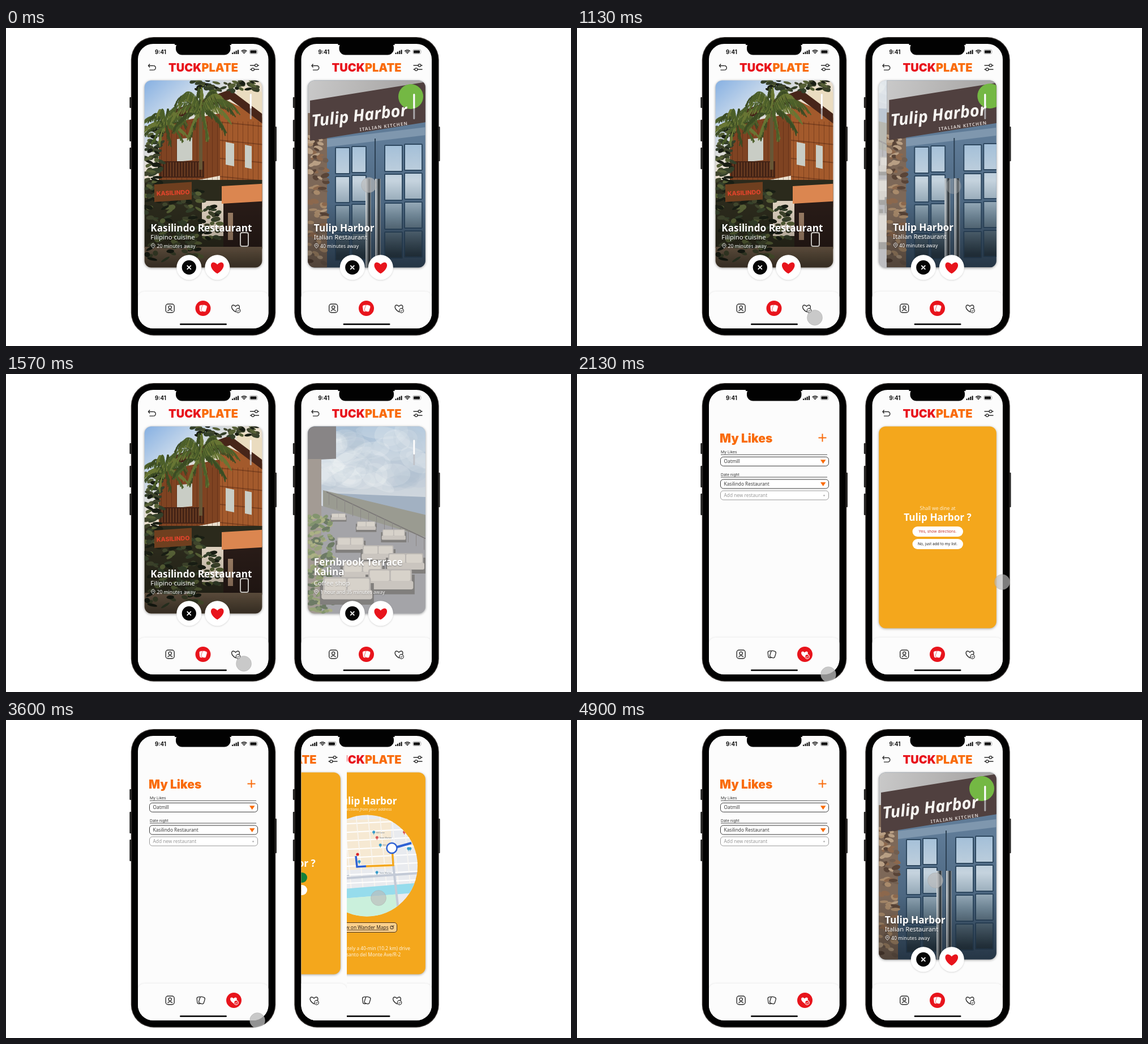
Animation of 998x561 px, one loop 4930 ms. Source, as an HTML page with a canvas:

```html
<!DOCTYPE html>
<html lang="en">
<head>
<meta charset="utf-8">
<title>Restaurant picker</title>
<style>
html, body { margin: 0; width: 100%; height: 100%; overflow: hidden; background: #fff }
canvas { display: block; width: 998px; height: 561px }
</style>
</head>
<body>
<canvas id="stage" width="998" height="561"></canvas>
<script>
const g = document.getElementById('stage').getContext('2d');
const LOOP = 4930, GAP = 288.5;
const RED = '#e8141c', ORANGE = '#f96c0c', AMBER = '#f4a71c', INK = '#2b2b2b', PAPER = '#fcfcfc';
const NOTO = '"Noto Sans", "Open Sans", sans-serif', INTER = 'Inter, sans-serif';
const CARD = { x: 244.7, y: 92.5, w: 207.6, h: 330, mid: 348.5 };

// ---------- helpers ----------
const smooth = (t, from, to) => {
  const p = Math.min(1, Math.max(0, (t - from) / (to - from)));
  return p * p * (3 - 2 * p);
};
const repeat = (n, draw) => { for (let i = 0; i < n; i++) draw(i); };
let seed = 1;
const rnd = (a = 0, b = 1) => a + (b - a) * ((seed = seed * 16807 % 2147483647) / 2147483647);

function group(draw) { g.save(); draw(); g.restore(); }
function paint(fill, stroke, width = 1) {
  if (fill) { g.fillStyle = fill; g.fill(); }
  if (stroke) { g.strokeStyle = stroke; g.lineWidth = width; g.stroke(); }
}
function rect(fill, x, y, w, h) { g.fillStyle = fill; g.fillRect(x, y, w, h); }
function box(x, y, w, h, r, fill, stroke, width) {
  g.beginPath(); g.roundRect(x, y, w, h, r); paint(fill, stroke, width);
}
function disc(x, y, r, fill, stroke, width) {
  g.beginPath(); g.arc(x, y, r, 0, 7); paint(fill, stroke, width);
}
function arc(x, y, r, from, to, width, color = INK) {
  g.beginPath(); g.arc(x, y, r, from, to); paint(null, color, width);
}
function line(color, width, ...p) {
  g.beginPath();
  for (let i = 0; i < p.length; i += 2) g.lineTo(p[i], p[i + 1]);
  paint(null, color, width);
}
// A block with upright sides whose top and bottom follow a slope.
function panel(fill, x, y, w, h, slope) {
  group(() => { g.transform(1, slope, 0, 1, x, y); rect(fill, 0, 0, w, h); });
}
function text(s, x, y, size, color, { weight = 400, family = NOTO, align = 'left', style = '' } = {}) {
  g.font = `${style} ${weight} ${size}px ${family}`;
  g.textAlign = align; g.fillStyle = color; g.fillText(s, x, y);
  return g.measureText(s).width;
}
function tilted(s, x, y, slope, ...rest) {
  group(() => { g.translate(x, y); g.rotate(slope); text(s, 0, 0, ...rest); });
}
function ramp(x0, y0, x1, y1, ...colors) {
  const f = g.createLinearGradient(x0, y0, x1, y1);
  colors.forEach((c, i) => f.addColorStop(i / (colors.length - 1), c));
  return f;
}
function shadowed(blur, alpha, draw) {
  group(() => { g.shadowColor = `rgba(0,0,0,${alpha})`; g.shadowBlur = blur; g.shadowOffsetY = 1; draw(); });
}
function specks(n, x, y, w, h, size, colors) {
  seed = 97 + Math.round(x * 3 + y);
  repeat(n, i => {
    g.beginPath();
    g.ellipse(x + rnd() * w, y + rnd() * h, size * rnd(.6, 1.3), size * rnd(.3, .7), rnd(-.6, .6), 0, 7);
    paint(colors[i % colors.length]);
  });
}

// ---------- icons ----------
function heart(x, y, s) {
  g.beginPath(); g.moveTo(x, y + s * .9);
  g.bezierCurveTo(x - s * 1.7, y - s * .15, x - s * .85, y - s * 1.45, x, y - s * .5);
  g.bezierCurveTo(x + s * .85, y - s * 1.45, x + s * 1.7, y - s * .15, x, y + s * .9);
}
function profileIcon(x, y) {
  box(x - 7.5, y - 7.5, 15, 15, 4, null, INK, 1.4);
  disc(x, y - 1.8, 2.6, null, INK, 1.3);
  arc(x, y + 7, 4.6, 3.6, 5.8, 1.3);
}
function cardsIcon(x, y, on) {
  if (on) disc(x, y, 13.5, RED);
  for (const side of [-1, 1]) group(() => {
    g.translate(x + side * 2, y); g.rotate(side > 0 ? .3 : -.12);
    box(-4.5, -6, 9, 12, 3, on ? '#fff' : PAPER, on ? RED : INK, on ? .6 : 1.3);
  });
}
function likesIcon(x, y, on) {
  if (on) disc(x, y, 13.5, RED);
  heart(x - .5, y, on ? 6 : 7); paint(on ? '#fff' : null, on ? null : INK, 1.4);
  disc(x + 4, y + 4, 3.8, on ? RED : PAPER, on ? '#fff' : INK, 1.2);
  line(on ? '#fff' : INK, 1, x + 2, y + 4, x + 3.6, y + 5.5, x + 6, y + 2.6);
}
function pinIcon(x, y) {
  g.beginPath(); g.arc(x, y, 3.3, 2.6, 6.8); g.lineTo(x, y + 5); g.closePath();
  paint(null, '#fff', .9); disc(x, y, 1.1, null, '#fff', .7);
}
function plus(x, y, r, turn, color, width) {
  group(() => {
    g.translate(x, y); g.rotate(turn);
    line(color, width, -r, 0, r, 0); line(color, width, 0, -r, 0, r);
  });
}

// ---------- shared screen parts (left phone coordinates) ----------
function blank() {
  rect(PAPER, 232, 27, 232, 505);
  text('9:41', 263, 45.6, 9.7, '#111', { weight: 700, family: INTER });
  repeat(4, i => box(399 + i * 3.3, 43.5 - i * 1.7, 2.2, 2.5 + i * 1.7, .6, '#111'));
  repeat(3, i => arc(420.5, 46, 2 + i * 2.5, 3.95, 5.48, 1.5, '#111'));
  box(430.3, 38.2, 14, 7.4, 2.2, null, '#999', .8);
  box(431.5, 39.4, 11, 5, 1.2, '#111');
}
function header() {
  line(INK, 1.4, 254, 63.5, 251.5, 66.5, 254, 69.5);
  line(INK, 1.4, 251.5, 66.5, 260.5, 66.5);
  arc(260.5, 70.3, 3.8, -1.57, 1.57, 1.4);
  line(INK, 1.4, 260.5, 74.1, 253.5, 74.1);
  for (const side of [-1, 1]) {
    const y = 69.5 + side * 3.5;
    line(INK, 1.3, 431, y, 447, y); disc(439 - side * 3, y, 2.4, PAPER, INK, 1.3);
  }
  const style = { weight: 900, family: INTER };
  g.font = `900 20px ${INTER}`;
  const x = CARD.mid - g.measureText('TUCKPLATE').width / 2;
  const w = text('TUCK', x, 76.7, 20, RED, style);
  text('PLATE', x + w, 76.7, 20, ORANGE, style);
}
function nav(active, cardsX = 348, likesX = 406) {
  shadowed(4, .16, () => box(232.5, 465, 231.5, 80, 12, PAPER));
  profileIcon(289.7, 494.5);
  cardsIcon(cardsX, 494.5, active === 'cards');
  likesIcon(likesX, 494.5, active === 'likes');
  box(307, 521.3, 83, 2.8, 1.4, '#111');
}
function caption(title, kind, away, bottom = 358.5) {
  shadowed(2, .35, () => {
    const lines = title.split('\n');
    lines.forEach((s, i) => text(s, 255.3, bottom - (lines.length - 1 - i) * 17, 17.2, '#fff', { weight: 700 }));
    text(kind, 255.3, 373.3, 11.3, '#fff');
    text(away, 266.5, 388, 8.6, '#fff');
    pinIcon(259.8, 383.5);
  });
}
function shade() {
  rect(ramp(0, 310, 0, 422, 'rgba(0,0,0,0)', 'rgba(0,0,0,.35)'), 244, 310, 210, 114);
}
function deck(content) {
  blank(); header();
  shadowed(4, .4, () => box(CARD.x, CARD.y, CARD.w, CARD.h, 12, '#ccc'));
  group(() => {
    g.beginPath(); g.roundRect(CARD.x, CARD.y, CARD.w, CARD.h, 12); g.clip();
    content();
  });
  box(430.8, 116, 3, 45, 1.5, 'rgba(190,190,195,.8)');
  box(430.8, 116, 3, 26, 1.5, '#fff');
  for (const x of [323.3, 373.3]) shadowed(3, .15, () => disc(x, 422.3, 22, '#fff'));
  disc(323.3, 422.3, 12.6, '#050505');
  plus(323.3, 422.3, 5, Math.PI / 4, '#fff', 1.8);
  heart(373.3, 423, 11.5); paint(RED);
  nav('cards');
}

// ---------- pictures ----------
function palm(x, y, r, n) {
  seed = 31 + Math.round(x);
  repeat(n, i => {
    const a = i / n * 6.28 + rnd(-.2, .2), ex = Math.cos(a) * r * rnd(.8, 1.1), ey = Math.sin(a) * r * .65 + r * .25;
    const color = ['#3c4c24', '#687634', '#4c5f2a'][i % 3];
    for (let t = .05; t <= 1; t += .045) {
      const bend = 2 * (1 - t) * t, px = x + bend * ex * .6 + t * t * ex, py = y + bend * (ey - r * .5) + t * t * ey;
      line(color, 2, px, py, px + ex * .12 + rnd(-3, 3), py + r * .24);
    }
  });
}
function house() {
  rect(ramp(245, 92, 330, 190, '#86b0e2', '#c4d6ea', '#eadfce'), 244, 92, 210, 331);
  panel('#eadcc0', 408, 100, 46, 60, .3);
  panel('#7f4322', 270, 172, 108, 110, -.2);
  panel('#a35a2c', 378, 122, 76, 158, .48);
  repeat(20, i => rect('rgba(60,25,10,.35)', 274 + i * 9, 165, 1, 110));
  repeat(4, i => panel('rgba(70,30,15,.4)', 378, 165 + i * 32, 76, 2, .1));
  panel('#472519', 292, 146, 104, 17, -.36);
  panel('#472519', 396, 109, 58, 17, .75);
  repeat(3, i => panel('#c9cdc5', 302 + i * 51 + (i ? 52 - i * 17 : 0), 196 + i * 5, i ? 18 - i * 3 : 27, 40, i ? .2 : -.1));
  rect('#452416', 272, 235, 78, 29);
  repeat(15, i => rect('#7c4827', 275 + i * 5, 237, 1.3, 25));
  rect('#2b2a1c', 244, 268, 210, 120);
  rect('#dccfbd', 346, 305, 38, 62);
  rect('#281b17', 384, 304, 70, 86);
  rect('#9d7f66', 392, 326, 9, 48);
  panel('#db8650', 381, 279, 73, 31, -.06);
  rect(ramp(0, 386, 0, 422, '#75614c', '#514434'), 244, 386, 210, 38);
  box(414, 361, 14, 24, 3, null, '#f4f0ea', 2);
  const leaf = ['#34402a', '#191e14', '#566036', '#3f452c'];
  specks(110, 246, 285, 100, 125, 7, leaf);
  specks(60, 246, 165, 28, 120, 7, leaf);
  specks(45, 330, 92, 112, 20, 6, leaf);
  specks(25, 352, 315, 26, 60, 6, leaf);
  panel('#6f3f1f', 262, 276, 66, 31, -.07);
  tilted('KASILINDO', 266, 296, -.05, 10.6, '#e0442c', { weight: 800, family: INTER });
  rect('#675635', 341, 145, 6, 105);
  palm(282, 165, 40, 15); palm(345, 137, 57, 21);
  shade();
  caption('Kasilindo Restaurant', 'Filipino cuisine', '20 minutes away');
}
function garden() {
  group(() => {
    g.translate(-GAP, 0);
    rect(ramp(0, 200, 0, 422, '#5f7b97', '#3a536b'), 533, 92, 209, 331);
    rect(ramp(533, 92, 700, 130, '#c9c9c9', '#a9a7a6'), 533, 92, 209, 60);
    rect('#7d6858', 533, 150, 34, 273);
    specks(75, 534, 192, 31, 228, 7, ['#a88a6b', '#594437', '#b89f84', '#8c684d', '#715e50']);
    panel('#7f97ae', 567, 196, 175, 14, -.12);
    const glass = ramp(0, 205, 0, 400, '#a3bfd8', '#c5d3de', '#71899a', '#2c3e4c');
    repeat(16, i => {
      const col = i % 4, right = col > 1, w = right ? 31 : 25;
      const x = (right ? 669 : 582) + (col % 2) * (w + 4), y = 211 - col * 2 + (i >> 2) * 51;
      box(x, y, w, 46, 1, glass, '#2e4860', 2);
    });
    rect('#2c4053', 651, 195, 2, 228);
    panel('#50403f', 537, 128, 205, 71, -.16);
    for (const x of [635, 652]) rect(ramp(x, 0, x + 10, 0, '#dfe3e6', '#8b949a', '#20282e', '#939da5'), x, 266, 10, 157);
    disc(715, 121, 22, '#74b844');
    tilted('Tulip Harbor', 541, 174, -.115, 29, '#f8f6f2', { weight: 800, style: 'italic' });
    g.letterSpacing = '1.1px';
    tilted('ITALIAN KITCHEN', 625, 182, -.13, 8, '#d5cdca', { weight: 600 });
  });
  shade();
  caption('Tulip Harbor', 'Italian Restaurant', '40 minutes away');
}
function sofa(x, y, s) {
  group(() => {
    g.translate(x, y); g.scale(s, s);
    rect('#55524f', -4, 8, 70, 28);
    box(0, 0, 62, 20, 3, '#a39e98');
    repeat(2, i => box(2 + i * 30, 2, 28, 15, 2, '#cbc4ba'));
    box(-2, 17, 66, 12, 3, '#bab3aa');
  });
}
function terrace() {
  group(() => {
    g.translate(-GAP, 0);
    rect(ramp(0, 92, 0, 225, '#86a9cb', '#aebfd0', '#c3ccd5'), 533, 92, 209, 331);
    specks(70, 545, 100, 195, 90, 32, ['rgba(240,243,246,.22)', 'rgba(140,162,185,.16)']);
    panel('#8297af', 565, 210, 177, 80, .04);
    panel('#77786a', 560, 205, 182, 90, .24);
    panel('#85858a', 556, 232, 186, 300, .3);
    panel('#4e4a48', 566, 207, 176, 2, .47);
    repeat(13, i => rect('#625e5c', 570 + i * 14, 209 + i * 6.6, 1, 22));
    panel('#5e5a5c', 533, 92, 50, 60, -.05);
    rect('#83786f', 533, 150, 24, 273);
    specks(150, 534, 250, 42, 170, 6, ['#718248', '#394c2e', '#8f955a', '#566f3a']);
    repeat(9, i => sofa(575 + (i * 47) % 125 - i * 2, 246 + i * 14, .4 + i * .12));
  });
}

// ---------- screens ----------
function swipe(s) {
  const rest = 1 - s;
  deck(() => {
    if (s > 0) {
      group(() => {
        const zoom = 1 + .45 * rest;
        g.translate(CARD.x - 198 * rest, 385); g.scale(zoom, zoom); g.translate(-CARD.x, -385);
        terrace();
      });
      rect(`rgba(245,245,245,${.28 + .25 * rest})`, 244, 92, 210, 331);
      group(() => {
        g.translate(-240 * rest, 20 * rest);
        caption('Fernbrook Terrace\nKalina', 'Coffee shop', '1 hour and 35 minutes away', 354.5);
      });
    }
    if (s < 1) group(() => {
      g.translate(230 * s, -16 * s);
      g.beginPath(); g.rect(244, 92, 210, 360); g.clip();
      garden();
    });
  });
}
function amberCard() {
  blank(); header();
  shadowed(4, .35, () => box(CARD.x, CARD.y, CARD.w, 356, 12, AMBER));
}
const center = (s, y, size, color, more) => text(s, CARD.mid, y, size, color, { align: 'center', ...more });
function pill(label, y, fill, color) {
  box(304, y, 89.5, 18, 9, fill);
  center(label, y + 11.4, 6.7, color, { family: INTER });
}
function ask(pressed) {
  amberCard();
  center('Shall we dine at', 240.3, 8.6, 'rgba(255,255,255,.8)');
  center('Tulip Harbor ?', 259, 17.2, '#fff', { weight: 700 });
  pill('Yes, show directions.', 269, pressed ? '#13803b' : '#fff', pressed ? '#fff' : '#c4312b');
  pill('No, just add to my list.', 291, '#fff', '#222');
  nav('cards');
}
function cityMap() {
  const blue = '#2f62d4';
  g.translate(-GAP, 0);
  g.beginPath(); g.arc(637.5, 257, 89.5, 0, 7); g.clip();
  rect('#e9ebef', 545, 165, 185, 185);
  panel('#f6e9d3', 570, 178, 110, 88, -.04);
  repeat(8, i => {
    panel('#fff', 545, 185 + i * 15, 185, 2, -.05);
    line('#f9f6f1', 1.6, 555 + i * 21, 165, 568 + i * 21, 300);
  });
  panel('#c3cad6', 545, 281, 185, 4, -.07);
  panel('#96dcec', 545, 302, 185, 17, -.08);
  panel('#caf0dc', 545, 319, 147, 60, -.08);
  line('#c3cad6', 4, 684, 256, 694, 345);
  seed = 12;
  repeat(16, i => {
    const x = rnd(565, 715), y = rnd(182, 290), color = i % 5 ? '#379ccb' : '#d95858';
    disc(x, y, 2.5, color); line(color, 1, x, y, x, y + 4.5);
    if (i % 2) text(i % 4 > 1 ? 'Mill Lane' : 'Town Market', x + 4, y + 2, 3.6, '#6e7c8d');
  });
  line(AMBER, 3.5, 636, 258, 684, 256, 682, 226);
  line(blue, 3.5, 618, 240, 620, 259, 636, 258);
  line(blue, 4, 684, 226, 716, 217);
  disc(681.5, 226, 9, '#fff', blue, 2.5);
  disc(621, 237, 2.6, '#d8252a');
}
function directions() {
  amberCard();
  center('Tulip Harbor', 149, 17.2, '#fff', { weight: 700 });
  center('Directions from your address', 160, 6.9, 'rgba(255,255,255,.8)', { style: 'italic' });
  group(cityMap);
  box(295, 357.5, 107, 17, 4.5, '#fbd08c', '#4a331e', 1);
  const w = text('View on Wander Maps', 343.5, 368.8, 8.4, '#2d2118', { align: 'center' });
  rect('#2d2118', 343.5 - w / 2, 370, w, .8);
  box(390.5, 363.5, 5, 5, 1, null, '#2d2118', 1);
  line('#2d2118', 1, 393, 366, 396.8, 362.2);
  center('Approximately a 40-min (10.2 km) drive', 406, 8.4, 'rgba(255,255,255,.85)');
  center('via Crisanto del Monte Ave/R-2', 417, 8.4, 'rgba(255,255,255,.85)');
  nav('', 348, 402.5);
}
function field(label, y, color) {
  box(253.5, y, 191, 16, 5, '#fff', color, 1);
  text(label, 259.5, y + 11, 8.3, color);
}
function likes() {
  blank();
  text('My Likes', 252, 121, 21, ORANGE, { weight: 900, family: INTER });
  plus(433.5, 112.5, 7, 0, ORANGE, 2);
  [['My Likes', 'Oatmill'], ['Date night', 'Kasilindo Restaurant']].forEach(([title, name], i) => {
    const y = 146.3 + i * 39.7;
    text(title, 254, y - 6, 6.8, '#333', { family: INTER });
    rect('#555', 254, y - 4.5, 188, 1);
    field(name, y, '#3a3a3a');
    g.beginPath(); g.moveTo(430, y + 5); g.lineTo(439.5, y + 5); g.lineTo(434.7, y + 12); paint(ORANGE);
  });
  field('Add new restaurant', 206, '#999');
  text('+', 436.5, 216.7, 7, '#777', { align: 'center' });
  nav('likes', 344, 402.5);
}

// ---------- phone ----------
function phone(x, screen, finger) {
  group(() => {
    g.translate(x, 0);
    repeat(3, i => box(218.3, 122 + i * 44 - (i ? 9 - i * 5 : 0), 4, i ? 38 : 19, 1, '#222'));
    box(474, 174, 4, 61, 1, '#222');
    box(220.8, 16, 255.4, 526.4, 40, '#2f2b29');
    box(222.3, 17.5, 252.4, 523.4, 38.5, '#020202');
    group(() => { g.beginPath(); g.roundRect(233, 28, 230.5, 502, 27); g.clip(); screen(); });
    box(300, 24, 96.5, 23.5, 11, '#020202');
    rect('#020202', 298, 24, 100, 6);
    g.beginPath(); g.roundRect(220.8, 16, 255.4, 527, 40); g.clip();
    g.globalAlpha = finger.alpha;
    disc(finger.x - x, finger.y, 13.5, 'rgba(188,188,188,.78)', 'rgba(150,150,150,.35)', 1);
  });
}
// Eases a point through moves given as [start, end, x, y].
function travel(t, x, y, moves) {
  for (const [from, to, mx, my] of moves) {
    const p = smooth(t, from, to);
    x += (mx - x) * p; y += (my - y) * p;
  }
  return { x, y };
}
function leftFinger(t) {
  const point = travel(t, 395, 465, [[650, 1000, 420, 511], [1600, 2000, 444, 530]]);
  return { ...point, alpha: smooth(t, 650, 1000) - smooth(t, 4200, 4400) };
}
function rightFinger(t) {
  const point = travel(t, 641, 277, [[1030, 1490, 836, 294], [1500, 2100, 751, 367],
    [2170, 2850, 637, 279], [3330, 3600, 658, 314], [4300, 4880, 633, 283]]);
  return { ...point, alpha: t > 1060 && t < 1500 ? .4 : .85 };
}

function dissolve(amount, from, to) {
  if (amount < 1) from();
  if (amount > 0) group(() => { g.globalAlpha = amount; to(); });
}
function rightScreen(t) {
  if (t < 1920) dissolve(smooth(t, 1720, 1920), () => swipe(smooth(t, 1065, 1500)), () => ask(false));
  else if (t < 4420) {
    const s = smooth(t, 3390, 3740);
    if (s > 0) directions();
    if (s < 1) group(() => {
      g.translate(-230 * s, 0);
      g.beginPath(); g.rect(232, 27, 231.5, 505); g.clip();
      ask(t > 3200);
    });
  } else swipe(0);
}
function frame(now) {
  const t = now % LOOP;
  rect('#fff', 0, 0, 998, 561);
  phone(0, () => dissolve(smooth(t, 1750, 1900), () => deck(house), likes), leftFinger(t));
  phone(GAP, () => rightScreen(t), rightFinger(t));
  requestAnimationFrame(frame);
}
requestAnimationFrame(frame);
</script>
</body>
</html>
```
